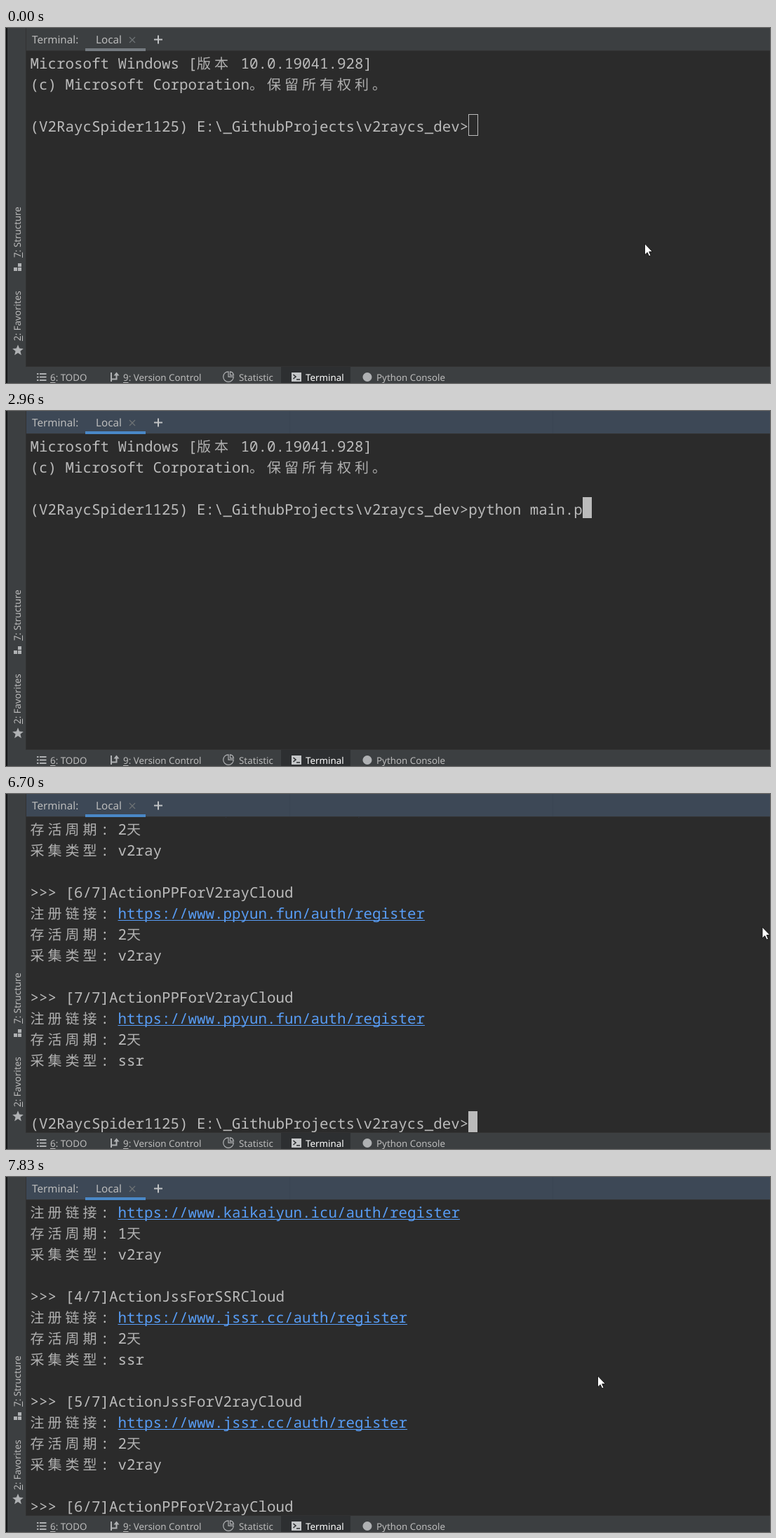
These frames come from a looping animation (1089 px wide and 507 px high, 8000 ms). An HTML page:

```html
<!DOCTYPE html>
<html lang="zh-CN">
<head>
<meta charset="utf-8">
<title>Terminal</title>
<style>
  html, body { margin: 0; width: 100%; height: 100%; overflow: hidden; background: #2b2b2b; }
  svg { display: block; width: 100%; height: 100%; }
  text { white-space: pre; text-rendering: geometricPrecision; fill: #bbb; }
  .ui { font: 13.35px "Noto Sans", "Open Sans", sans-serif; }
  .head { font-size: 15.2px; }
  .mono { font: 500 20.83px "Noto Sans Mono", "DejaVu Sans Mono", monospace; }
  .mono .cjk { font: 200 20px "Noto Sans CJK SC", "Noto Sans CJK JP", "Noto Sans CJK", sans-serif; fill: #b0b0b0; }
  .mono .link { fill: #589df6; }
  .icon { fill: #afb1b3; }
  .stroke { fill: none; stroke: #afb1b3; }
</style>
</head>
<body>
<svg viewBox="0 0 1089 507">
  <defs><clipPath id="pane"><rect x="29" y="33" width="1060" height="450"/></clipPath></defs>
  <rect width="1089" height="507" fill="#2b2b2b"/>

  <g clip-path="url(#pane)">
    <g id="shell" class="mono"></g>
    <g id="log" class="mono"></g>
    <rect id="caret" width="13" height="30"/>
  </g>

  <!-- header -->
  <rect id="header" x="29" width="1060" height="32"/>
  <path id="seams" d="M404.5 0V32M779.5 0V32" stroke="#37424f" opacity=".4"/>
  <rect x="29" y="32" width="1060" height="1" fill="#323232"/>
  <rect id="tabLine" x="113" y="29" width="86" height="4"/>
  <g class="ui">
    <text class="head" x="37" y="22">Terminal:</text>
    <text class="head" x="128" y="22">Local</text>
  </g>
  <path d="M176 13l8 8m0-8l-8 8" stroke="#6e7275" stroke-width="1.2"/>
  <path d="M211 16.5h12M217 10.5v12" stroke="#c0c2c4" stroke-width="2"/>

  <!-- side bar -->
  <rect width="29" height="507" fill="#3c3f41"/>
  <rect width="2" height="507" fill="#141516"/>
  <rect x="28" width="1" height="484" fill="#323232"/>
  <g class="ui" id="side"></g>
  <path class="icon" d="M17 336h5v5h-5zM11 342h5v5h-5zM17 342h5v5h-5z"/>
  <path id="star" class="icon"/>

  <!-- bottom bar -->
  <rect x="2" y="484" width="1087" height="23" fill="#3c3f41"/>
  <rect x="29" y="483" width="1060" height="1" fill="#323232"/>
  <rect x="392" y="484" width="99" height="23" fill="#2d2f31"/>
  <g class="ui" id="bottom"></g>
  <path class="stroke" stroke-width="2" d="M44 494h2.5M48 494h9.5M44 498.5h2.5M48 498.5h9.5M44 503h2.5M48 503h9.5"/>
  <path class="stroke" stroke-width="2" d="M150 492v13M150 501.5h7.5v-6"/>
  <path class="icon" d="M153.5 496.5l4-5 4 5z"/>
  <path class="stroke" stroke-width="1.2" d="M317 490.8a7.3 7.3 0 1 0 7.3 7.3h-7.3zM319.5 490.8a6 6 0 0 1 5 5h-5z"/>
  <rect x="407" y="492" width="14" height="13" fill="#c4c6c8"/>
  <path d="M409.5 495l3.5 3-3.5 3M414 502h5" fill="none" stroke="#2d2f31" stroke-width="1.6"/>
  <circle class="icon" cx="515" cy="498.5" r="6.5"/>

  <path id="mouse" d="M0 0V16L3.7 12.6 6.2 18 8.5 17 6.2 11.6H11Z" fill="#fff" stroke="#111" stroke-width=".9"/>
</svg>

<script>
const LOOP = 8000, LEFT = 34.5, TOP = 33, CELL = 12.5, ROW = 30;
const $ = id => document.getElementById(id);
const PROMPT = '(V2RaycSpider1125) E:\\_GithubProjects\\v2raycs_dev>';
const COMMAND = 'python main.py entropy';
const KEY_TIMES = [1280, 1600, 1790, 1840, 1890, 2070, 2220, 2310, 2450, 2500, 2550,
  2820, 2960, 3060, 3240, 3480, 3520, 3710, 3900, 4000, 4140, 4600];
const SCROLL_TIMES = [6933, 6980, 7120, 7190, 7260, 7490, 7547, 7603, 7660, 7717, 7773];
const FOCUS = 30, ENTER = 4840, CARET_OFF = 5350, OUTPUT = 5810, DONE = 5860;

const isWide = s => /[\u3000-\uffef]/.test(s);
const passed = (times, t) => times.filter(x => x <= t).length;

// Wide characters take two cells each.
function lineMarkup(line, row) {
  const runs = line.match(/https\S+|[\u3000-\uffef]|(?:(?!https)[^\u3000-\uffef])+/g) || [];
  const y = TOP + row * ROW + 25;
  let col = 0;
  return runs.map(run => {
    const x = LEFT + col * CELL, link = run.startsWith('https');
    const cells = isWide(run) ? 2 : run.length;
    col += cells;
    const cls = link ? 'link' : isWide(run) ? 'cjk' : '';
    const rule = link
      ? `<rect class="link" x="${x}" y="${y + 2}" width="${cells * CELL}" height="1"/>` : '';
    return `<text class="${cls}" x="${x}" y="${y}">${run}</text>${rule}`;
  }).join('');
}
const block = lines => lines.map(lineMarkup).join('');

const details = (host, days, type) => [
  `注册链接: https://www.${host}/auth/register`, `存活周期: ${days}天`, `采集类型: ${type}`, ''];
const item = (n, name, ...rest) => [`>>> [${n}/7]Action${name}Cloud`, ...details(...rest)];
const LOG = [
  ...details('kaikaiyun.icu', 1, 'v2ray'),
  ...item(4, 'JssForSSR', 'jssr.cc', 2, 'ssr'),
  ...item(5, 'JssForV2ray', 'jssr.cc', 2, 'v2ray'),
  ...item(6, 'PPForV2ray', 'ppyun.fun', 2, 'v2ray'),
  ...item(7, 'PPForV2ray', 'ppyun.fun', 2, 'ssr'),
  '', PROMPT];
const BANNER = ['Microsoft Windows [版本 10.0.19041.928]', '(c) Microsoft Corporation。保留所有权利。', ''];

$('log').innerHTML = block(LOG);

// The mnemonic digit in front of a label is underlined.
function label(text, x, y, extra = '') {
  const rule = /^\d:/.test(text) ? `<rect x="0" y="2" width="7.5" height="1" fill="#bbb"/>` : '';
  return `<g transform="translate(${x} ${y}) ${extra}"><text>${text}</text>${rule}</g>`;
}
$('side').innerHTML = label('7: Structure', 21, 328, 'rotate(-90)') + label('2: Favorites', 21, 447, 'rotate(-90)');
$('bottom').innerHTML = label('6: TODO', 63, 504) + label('9: Version Control', 167, 504) +
  label('Statistic', 332, 504) + label('Terminal', 427, 504) + label('Python Console', 528, 504);
$('bottom').children[3].firstChild.style.fill = '#fff';
$('star').setAttribute('d', 'M' + Array.from({ length: 10 }, (_, i) => {
  const r = i % 2 ? 3.6 : 8.3, a = i * Math.PI / 5 - Math.PI / 2;
  return `${(17 + r * Math.cos(a)).toFixed(2)} ${(460.5 + r * Math.sin(a)).toFixed(2)}`;
}).join('L') + 'Z');

const mix = (a, b, p) => a + (b - a) * p;

function mouseAt(t) {
  if (t < 30) return [910.5, 308];
  if (t < 490) {
    const p = (Math.floor((t - 30) / 51.1) + 1) / 10;
    return [mix(910.5, 1095, p * p), mix(308, 200, p * p)];
  }
  if (t < 6700) return null;
  if (t < 7490) {
    const p = Math.min(1, Math.floor((t - 6700) / 46.6) / 4), e = p * (2 - p);
    return [mix(1078, 844.5, e), mix(190, 290, e)];
  }
  const p = Math.min(1, (Math.floor((t - 7490) / 56.6) + 1) / 7);
  return [mix(844.5, 843.5, p), Math.round(mix(290, 284, p))];
}

function caretAt(t, typed, top) {
  if (t < ENTER) return [PROMPT.length + typed, 3];
  if (t < CARET_OFF) return [0, 4];
  if (t < DONE) return null;
  return [PROMPT.length, LOG.length - 1 - top];
}

function place(el, point) {
  el.style.display = point ? '' : 'none';
  if (point) el.setAttribute('transform', `translate(${point[0]} ${point[1]})`);
}

let shownTyped = -1;
function draw(t) {
  const focused = t >= FOCUS, typed = passed(KEY_TIMES, t);
  const top = t < DONE ? 10 : 11 - passed(SCROLL_TIMES, t);

  if (typed !== shownTyped) {
    $('shell').innerHTML = block([...BANNER, PROMPT + COMMAND.slice(0, typed)]);
    shownTyped = typed;
  }
  $('shell').style.display = t < OUTPUT ? '' : 'none';
  $('log').style.display = t < OUTPUT ? 'none' : '';
  $('log').setAttribute('transform', `translate(0 ${-top * ROW})`);

  $('header').setAttribute('fill', focused ? '#3d4856' : '#3c3f41');
  $('seams').style.display = focused ? '' : 'none';
  $('tabLine').setAttribute('fill', focused ? '#4a88c7' : '#747a80');

  const caret = $('caret'), cell = caretAt(t, typed, top);
  caret.setAttribute('fill', focused ? '#bbb' : 'none');
  caret.setAttribute('stroke', focused ? 'none' : '#bbb');
  place(caret, cell && [Math.floor(LEFT + cell[0] * CELL) + (focused ? 0 : .5),
    TOP + cell[1] * ROW + (focused ? 0 : .5)]);
  place($('mouse'), mouseAt(t));
}

const start = performance.now();
function tick() {
  draw((performance.now() - start) % LOOP);
  requestAnimationFrame(tick);
}
tick();
</script>
</body>
</html>
```
